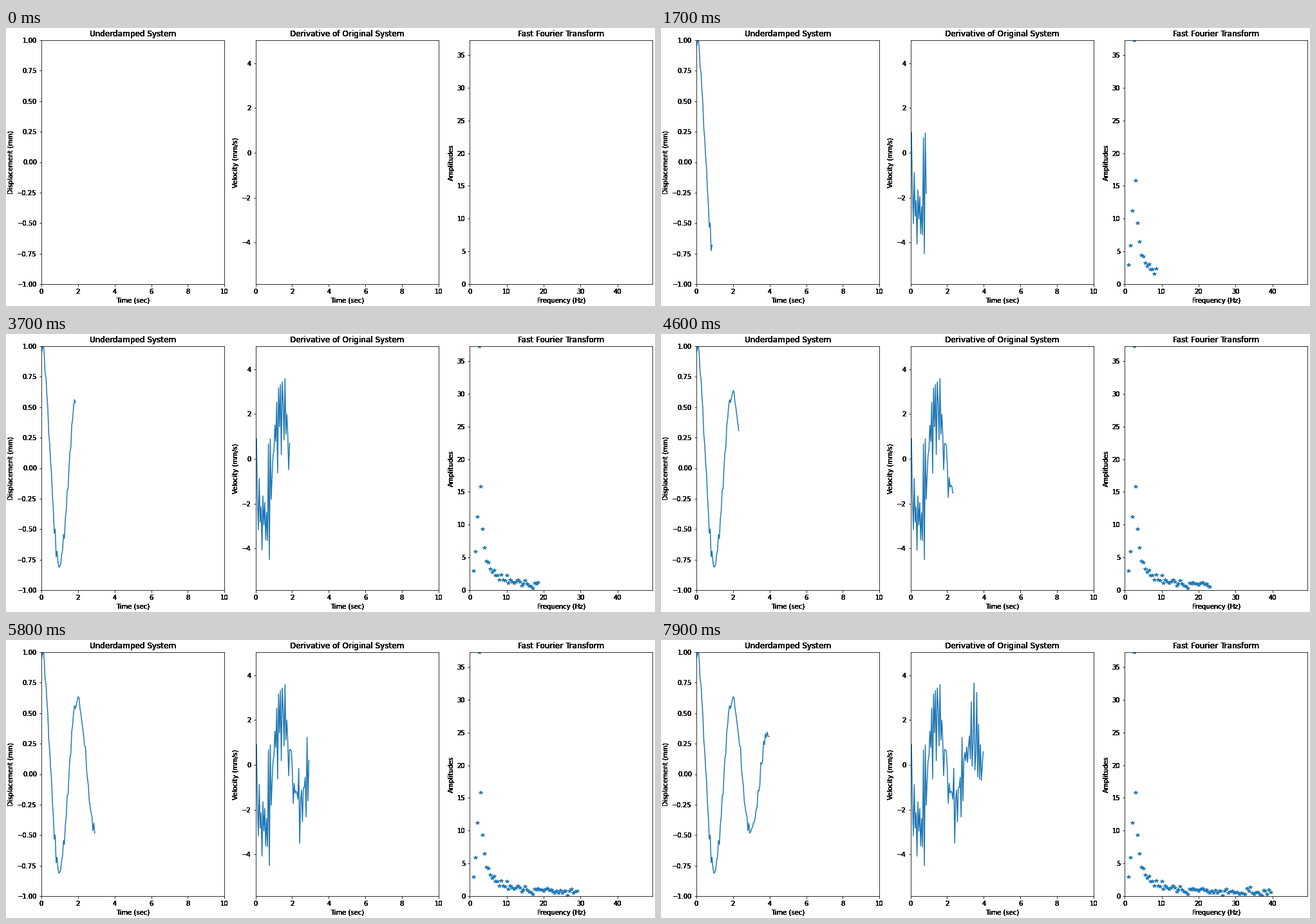
Animation of 1008x432 px, one loop 8000 ms. Source, as a matplotlib script:

```python
import numpy as np
import matplotlib.pyplot as plt
from matplotlib.animation import FuncAnimation

W, H, DPI = 1008, 432, 72
FRAMES, STEP_MS = 80, 100
SAMPLES = 200
DECAY, NOISE = 0.246, 0.035
PEAK = 37.26

plt.rcParams["font.family"] = "DejaVu Sans"

# Noisy damped oscillation with a short lag at the start
rng = np.random.default_rng(4)
time = np.linspace(0, 10, SAMPLES)
lag = 0.08 * np.exp(-3 * time)
displacement = np.exp(-DECAY * time) * np.cos(np.pi * (time - lag))
displacement += rng.normal(0, NOISE, SAMPLES)

velocity = np.diff(displacement) / time[1]

# The two lowest frequency bins are not plotted
freq = 0.5 * np.arange(SAMPLES // 2)[2:]
amplitude = np.abs(np.fft.rfft(displacement))[2:SAMPLES // 2]
amplitude *= PEAK / amplitude.max()

fig = plt.figure(figsize=(W / DPI, H / DPI), dpi=DPI, facecolor="white")


def overdraw(artist, times=8):
    """Paint an artist repeatedly so its soft edges turn solid."""
    draw = artist.draw

    def repeat(renderer):
        for _ in range(times):
            draw(renderer)

    artist.draw = repeat


def panel(col, title, xlabel, ylabel, xlim, ylim):
    left = 55 + 332.6 * col
    ax = fig.add_axes([left / W, 34 / H, 284.2 / W, 379 / H])
    ax.set(title=title, xlabel=xlabel, ylabel=ylabel, xlim=xlim, ylim=ylim)
    for text in (ax.title, ax.xaxis.label, ax.yaxis.label,
                 *ax.get_xticklabels(), *ax.get_yticklabels()):
        overdraw(text)
    return ax


ax_disp = panel(0, "Underdamped System", "Time (sec)", "Displacement (mm)",
                (0, 10), (-1, 1))
ax_vel = panel(1, "Derivative of Original System", "Time (sec)",
               "Velocity (mm/s)", (0, 10), (-5.86, 5.02))
ax_fft = panel(2, "Fast Fourier Transform", "Frequency (Hz)", "Amplitudes",
               (0, freq[-1]), (0, PEAK))

disp_line, = ax_disp.plot([], [], color="C0", lw=1.5)
vel_line, = ax_vel.plot([], [], color="C0", lw=1.5)
stars, = ax_fft.plot([], [], "*", color="C0", ms=6)


def update(n):
    disp_line.set_data(time[:n + 1], displacement[:n + 1])
    vel_line.set_data(time[:n + 1], velocity[:n + 1])
    shown = max(n - 1, 0)
    stars.set_data(freq[:shown], amplitude[:shown])
    return disp_line, vel_line, stars


anim = FuncAnimation(fig, update, frames=FRAMES, interval=STEP_MS,
                     repeat=True, repeat_delay=0)
plt.show()
```
